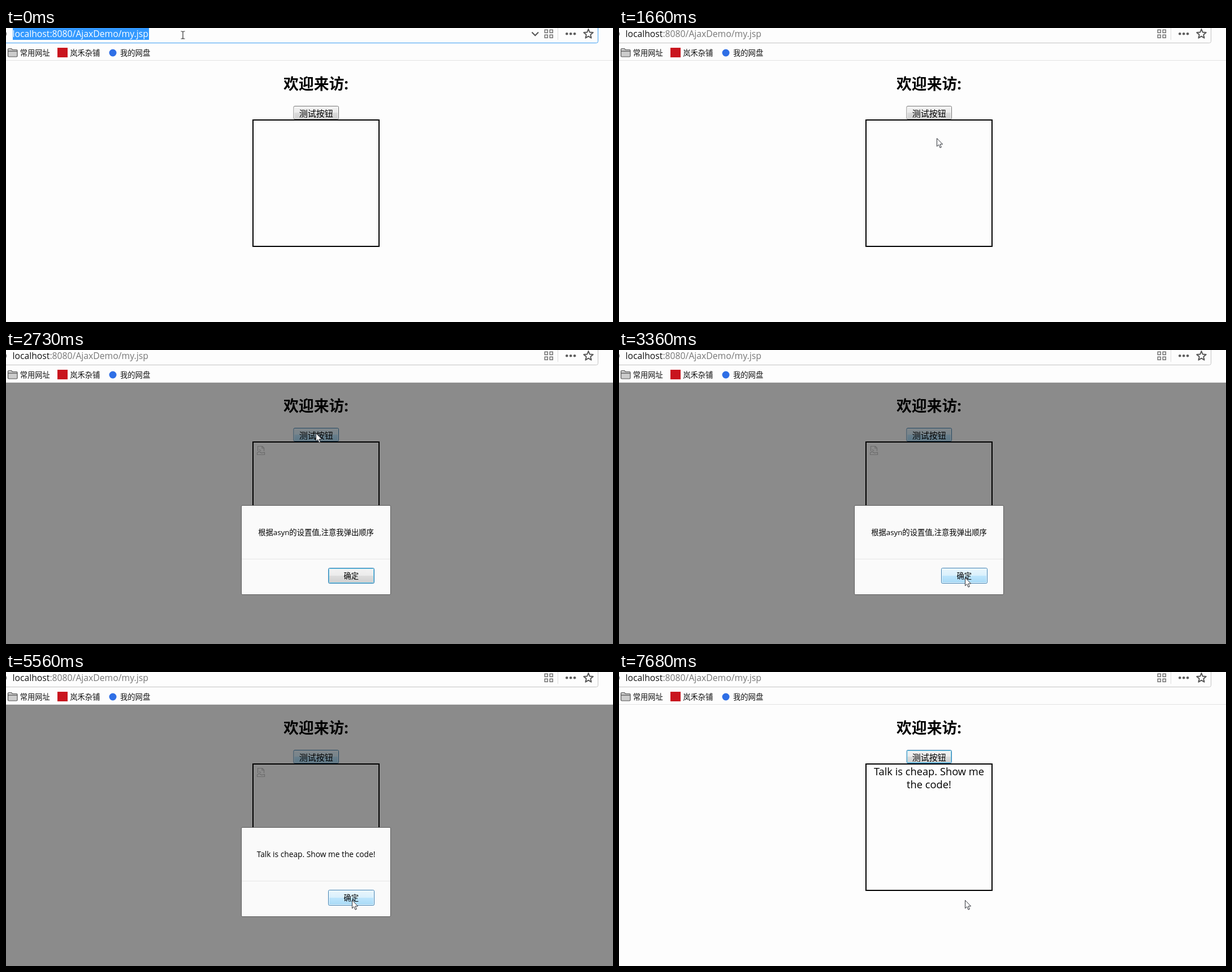
Animation, 1074 px wide and 521 px high, one loop 8 s. Source, as an HTML page:

```html
<!DOCTYPE html>
<html lang="zh-CN">
<head>
<meta charset="utf-8">
<title>Ajax demo</title>
<style>
html, body { margin: 0; width: 100%; height: 100%; overflow: hidden; background: #fdfdfd; }
svg { display: block; width: 1074px; height: 521px; }
text { font-family: 'Open Sans', 'Noto Sans CJK SC', 'Noto Sans CJK', sans-serif; white-space: pre; }
.mid { text-anchor: middle; }
.small { font-size: 13.3px; }
</style>
</head>
<body>
<svg viewBox="0 0 1074 521" fill="none">
  <defs id="defs"></defs>
  <rect width="1074" height="521" fill="#fdfdfd"/>

  <!-- address bar -->
  <path id="bar" d="M0 26.5H1044.5Q1047.5 26.5 1047.5 23.5V0"/>
  <path id="barLeft" d="M0 26.5H12"/>
  <circle cx="-4" cy="10.5" r="4.6" stroke="#777" stroke-width="1.4"/>
  <rect id="selection" x="12" width="241" height="21" fill="#39f"/>
  <text x="11.5" y="16" font-size="15.74"><tspan id="host">localhost</tspan><tspan id="path">:8080/AjaxDemo/my.jsp</tspan></text>
  <path id="chevron" d="M930.5 7.5L936.3 13.3L942 7.5" stroke="#555" stroke-width="2"/>
  <g stroke="#777" stroke-width="1.6">
    <rect x="953.3" y="3.3" width="5" height="5"/><rect x="962.3" y="3.3" width="5" height="5"/>
    <rect x="953.3" y="12.3" width="5" height="5"/><rect x="962.3" y="12.3" width="5" height="5"/>
  </g>
  <path d="M976.5 0V21" stroke="#ddd"/>
  <g fill="#5c5c5c"><circle cx="992.3" cy="10.3" r="2.3"/><circle cx="999.2" cy="10.3" r="2.3"/><circle cx="1006.1" cy="10.3" r="2.3"/></g>
  <path id="star" stroke="#555" stroke-width="1.9" stroke-linejoin="round"/>

  <!-- bookmarks -->
  <path d="M3.5 38Q3.5 36.5 5 36.5H9.5L11.5 38.5H18.5Q20 38.5 20 40V49.5Q20 51 18.5 51H5Q3.5 51 3.5 49.5ZM3.5 41.2H20" fill="#ccc" stroke="#555" stroke-width="1.2"/>
  <rect x="91" y="35" width="18" height="17" fill="#c9151e"/>
  <circle cx="189" cy="44" r="6.5" fill="#2f6fe6"/>
  <g class="small" fill="#111">
    <text x="24.7" y="49">常用网址</text>
    <text x="113.2" y="49">岚禾杂铺</text>
    <text x="202" y="49">我的网盘</text>
  </g>
  <path d="M0 57.5H1074" stroke="#e3e3e3"/>

  <!-- page -->
  <text class="mid" x="548.5" y="109" font-size="26.8" font-weight="700" fill="#000">欢迎来访:</text>
  <g id="testButton"></g>
  <rect x="437" y="163" width="223" height="224" stroke="#000" stroke-width="2"/>
  <g id="answer" class="mid" font-size="18.3" fill="#000">
    <text x="548.5" y="183">Talk is cheap. Show me</text>
    <text x="548.5" y="206">the code!</text>
  </g>

  <!-- alert -->
  <g id="alert">
    <rect y="58" width="1074" height="463" fill="#000" fill-opacity=".45"/>
    <path d="M445.5 179V170.5H453.5L456.5 173.5V179M453 170.5V174H456.5M444.5 185.5V182L448 180L452 182.5L457.5 181.5V185.5ZM448 176.5L451 178.5" stroke="#6c6c6c" stroke-width="1.2"/>
    <rect x="416.5" y="275.5" width="264" height="158" rx="1.5" fill="#fafafa" stroke="#5c5c5c"/>
    <path d="M417 370.5H680" stroke="#e6e6e6"/>
    <text id="message" class="mid" x="548.5" y="327.5" fill="#000"></text>
    <g id="okButton"></g>
  </g>

  <g id="beam" stroke="#333" stroke-width="1.2">
    <path d="M309.5 6H311.5Q313 6 313 7.5V17.5Q313 19 311.5 19H309.5M316.5 6H314.5Q313 6 313 7.5M313 17.5Q313 19 314.5 19H316.5"/>
  </g>
  <path id="arrow" d="M.5 .6V14.8L3.7 11.8L6 17.2L8.3 16.2L6 11H10.6Z" fill="#fff" stroke="#23262e" stroke-width=".95"/>
</svg>
<script>
const LOOP = 8000;
const $ = id => document.getElementById(id);
const set = (el, attrs) => { for (const k in attrs) el.setAttribute(k, attrs[k]); };
const show = (el, on) => { el.style.display = on ? '' : 'none'; };

// Button looks: four gradient colours, border, inner edge
const looks = {
  normal:  ['#f3f3f3', '#ebebeb', '#dddddd', '#cfcfcf', '#707070', '#fbfbfb'],
  focused: ['#f3f3f3', '#ebebeb', '#dddddd', '#cfcfcf', '#3c7fb1', '#67cbea'],
  hover:   ['#eaf6fd', '#d9f0fc', '#bee6fd', '#a7d9f5', '#3c7fb1', '#f0faff'],
  pressed: ['#e5f4fc', '#c4e5f6', '#98d1ef', '#68b3db', '#2c628b', '#a5cfe5']
};
$('defs').innerHTML = Object.entries(looks).map(([name, c]) =>
  `<linearGradient id="${name}" x2="0" y2="1">` +
  [0, .5, .5, 1].map((at, i) => `<stop offset="${at}" stop-color="${c[i]}"/>`).join('') +
  '</linearGradient>').join('');

function makeButton(id, x, y, w, h, label, size, labelX, labelY) {
  const g = $(id);
  g.innerHTML = `<rect x="${x + .5}" y="${y + .5}" width="${w - 1}" height="${h - 1}" rx="2"/>` +
    `<rect x="${x + 1.5}" y="${y + 1.5}" width="${w - 3}" height="${h - 3}" rx="1"/>` +
    `<text class="mid" y="${labelY}" font-size="${size}" fill="#000">${label}</text>`;
  const [face, edge, text] = g.children;
  return (look, shift = 0) => {
    set(face, { fill: `url(#${look})`, stroke: looks[look][4] });
    set(edge, { stroke: looks[look][5] });
    set(text, { x: labelX + shift });
  };
}
const paintTest = makeButton('testButton', 508.5, 138, 80.5, 24, '测试按钮', 15, 548.7, 156.6);
const paintOk = makeButton('okButton', 570, 386, 82, 28, '确定', 13.3, 610.7, 405);

let star = '';
for (let i = 0; i < 10; i++) {
  const a = i * Math.PI / 5, r = i % 2 ? 3.9 : 8.7;
  star += (i ? 'L' : 'M') + (1030.5 + r * Math.sin(a)).toFixed(2) + ' ' + (10.7 - r * Math.cos(a)).toFixed(2);
}
set($('star'), { d: star + 'Z' });

// Pointer steps: time, x, y
const steps = [
  [1390, 414, 147], [1540, 500, 234], [1660, 562, 195],
  [1810, 558, 175], [1930, 553, 159], [2050, 550, 150], [2170, 548, 147],
  [3000, 569, 272], [3120, 606, 394], [3240, 610, 401], [3360, 612, 403], [3510, 612, 404]
];

function draw(t) {
  const focused = t < 500, hovered = t < 1390;
  const blue = '#3a9df2', grey = hovered ? '#b2b2b2' : '#c4c4c4';
  set($('bar'), { stroke: focused ? blue : grey });
  set($('barLeft'), { stroke: t < 640 ? blue : grey });
  show($('selection'), focused);
  set($('host'), { fill: focused ? '#fff' : '#111' });
  set($('path'), { fill: focused ? '#fff' : '#777' });
  set($('chevron'), { opacity: hovered ? 1 : t < 1540 ? .4 : 0 });

  show($('beam'), t < 1240);
  const step = steps.filter(s => s[0] <= t).pop();
  show($('arrow'), !!step);
  if (step) set($('arrow'), { transform: `translate(${step[1]} ${step[2]})` });

  const testDown = t >= 2320 && t < 2730;
  paintTest(t < 1930 ? 'normal' : t >= 7680 ? 'focused' : testDown ? 'pressed' : 'hover', testDown ? 1 : 0);

  show($('alert'), t >= 2730 && t < 7680);
  const second = t >= 5560;
  $('message').textContent = second ? 'Talk is cheap. Show me the code!' : '根据asyn的设置值,注意我弹出顺序';
  set($('message'), { 'font-size': second ? 13.76 : 13.3 });
  const okDown = (t >= 4200 && t < 5560) || t >= 7090;
  paintOk(t < 3120 ? 'focused' : okDown ? 'pressed' : 'hover');
  show($('answer'), t >= 7680);
}

const start = performance.now();
function tick() {
  draw((performance.now() - start) % LOOP);
  requestAnimationFrame(tick);
}
tick();
</script>
</body>
</html>
```
